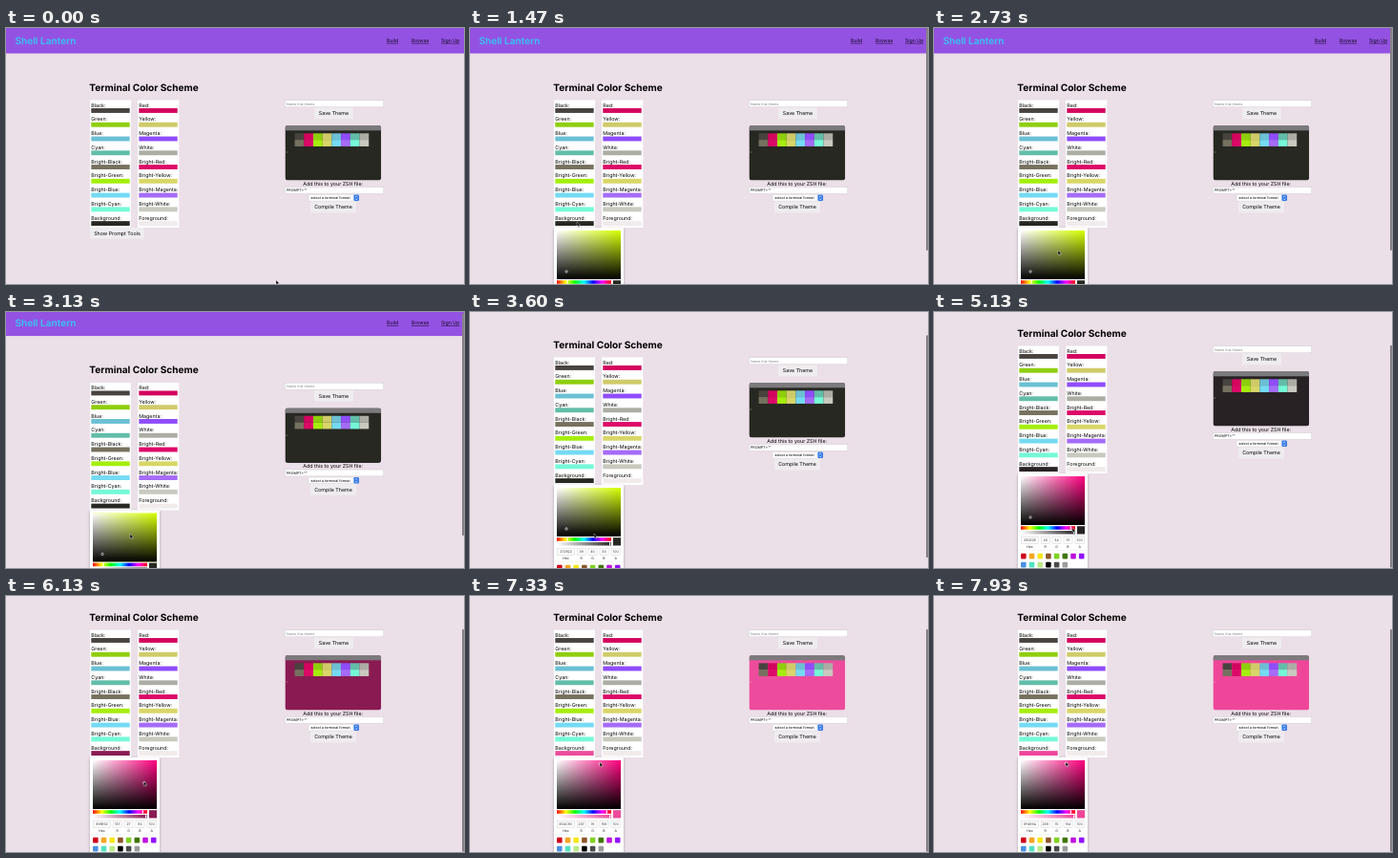
An HTML page that plays this animation: 480x268 px, repeating every 8000 ms.

```html
<!DOCTYPE html>
<html lang="en">
<head>
<meta charset="utf-8">
<title>Terminal Color Scheme</title>
<style>
  html, body { margin: 0; width: 100%; height: 100%; overflow: hidden; background: #ebdfe8; }
  svg { display: block; width: 480px; height: 268px; }
  text { font-family: Inter, Roboto, sans-serif; text-rendering: geometricPrecision; white-space: pre; }
</style>
</head>
<body>
<svg id="stage" viewBox="0 0 480 268"></svg>
<script>
const LOOP = 8000, OPEN = 1470, HUE_PRESS = 4200, SAT_PRESS = 5450;
const $ = id => document.getElementById(id);

// Markup helpers; text is placed by its vertical centre.
const rect = (x, y, w, h, fill, more = '') =>
  `<rect x="${x}" y="${y}" width="${w}" height="${h}" fill="${fill}" ${more}/>`;
const text = (x, y, str, size = 5.33, more = '') =>
  `<text x="${x}" y="${y + size * 0.36}" font-size="${size}" ${more}>${str}</text>`;
const mid = (x, y, str, size, more = '') => text(x, y, str, size, `text-anchor="middle" ${more}`);
const button = (x, y, w, label) =>
  rect(x, y, w, 11.8, '#efecef', 'rx=".6"') + mid(x + w / 2, y + 5.9, label);
const field = (x, y, w, h) =>
  rect(x, y, w, h, '#fff', 'stroke="#c9c4c9" stroke-width=".4"');
const gradient = (id, attrs, stops) => `<linearGradient id="${id}" ${attrs}>` +
  stops.map(([at, color, alpha = 1]) =>
    `<stop offset="${at}" stop-color="${color}" stop-opacity="${alpha}"/>`).join('') +
  '</linearGradient>';

const names = ['Black', 'Red', 'Green', 'Yellow', 'Blue', 'Magenta', 'Cyan', 'White'];
const labels = [...names, ...names.map(n => 'Bright-' + n), 'Background', 'Foreground'];
const colors = ['#48433f', '#d3055f', '#8fce0c', '#d0cb69', '#6bc0d3', '#8f4dfa', '#63bda8', '#adada5',
  '#76715e', '#dd0968', '#a5ee0e', '#d9d669', '#75daf3', '#a56cf8', '#74f9d6', '#c9c9bf',
  '#272822', '#f1ebeb'];
const presets = ['#d0021b', '#f5a623', '#f8e71c', '#8b572a', '#7ed321', '#417505', '#bd10e0', '#9013fe',
  '#4a90e2', '#50e3c2', '#b8e986', '#000', '#4a4a4a', '#9b9b9b', '#fff'];

const header = rect(0, 0, 480, 26.6, '#9452e2') +
  text(9.5, 13.2, 'Shell Lantern', 10.1, 'font-weight="600" fill="#35c5f2"') +
  [[399, 'Build'], [425, 'Browse'], [456, 'Sign Up']].map(([x, s]) =>
    text(x, 13, s, 5.2, 'fill="#10081c" text-decoration="underline"')).join('');

const swatches = rect(88, 75.5, 43, 133.5, '#fff') + rect(138, 75.5, 43.3, 133.5, '#fff') +
  labels.map((label, i) => {
    const x = i % 2 ? 139.3 : 89.3, y = 80.6 + (i >> 1) * 14.77;
    return text(x, y, label + ':') +
      rect(x, y + 3.4, 40.4, 4.9, colors[i], i === 16 ? 'class="chosen"' : '');
  }).join('');

const terminal = `<g clip-path="url(#window)">` +
  rect(292.5, 102, 100.7, 57.5, '#272822', 'class="chosen"') +
  rect(292.5, 102, 100.7, 5.3, '#7c7a7c') + '</g>' +
  colors.slice(0, 16).map((c, i) =>
    rect(302.6 + i % 8 * 9.7, 110.3 + (i >> 3) * 6.8, 9.75, 6.85, c)).join('') +
  text(293, 130, '~', 3.5, 'fill="#fff"');

const side = field(292.3, 75.8, 103.5, 7) +
  text(294, 79.4, 'Name this theme', 3.7, 'fill="#888"') +
  button(323, 83.5, 41, 'Save Theme') + terminal +
  mid(342.7, 162.9, 'Add this to your ZSH file:') +
  field(292.3, 166.6, 103.5, 6.8) + text(294, 170.1, 'PROMPT=""', 3.7) +
  rect(317, 174.6, 53, 6.4, '#fff', 'rx="1.2" stroke="#c4c0c4" stroke-width=".3"') +
  text(319.5, 177.8, 'select a terminal format', 3.7) +
  rect(364.4, 174.6, 5.6, 6.4, '#3478e5', 'rx="1.2"') +
  '<path d="M366 177.2l1.2-1.5 1.2 1.5M366 178.4l1.2 1.5 1.2-1.5" fill="none" stroke="#fff" stroke-width=".6"/>' +
  button(319, 181.6, 48, 'Compile Theme');

const values = [['Hex', 91.5, 18], ['R', 112.2, 9], ['G', 124, 9], ['B', 136, 9], ['A', 148, 9.5]];
const picker = `<g id="picker">` +
  rect(88, 209, 73, 104, '#fff', 'rx="1" filter="url(#shadow)"') +
  rect(91, 212, 67, 51, '#cf0', 'id="pure"') +
  rect(91, 212, 67, 51, 'url(#toWhite)') + rect(91, 212, 67, 51, 'url(#toBlack)') +
  '<circle id="handle" r="1.2" fill="none" stroke="#fff" stroke-width=".6"/>' +
  rect(91, 264.2, 57, 3.6, 'url(#rainbow)') +
  rect(0, 264.5, 1.3, 3, '#fff', 'id="hueMark"') +
  rect(91, 269, 57, 3.5, 'url(#alpha)') + rect(146, 269.3, 1.3, 2.9, '#fff') +
  rect(150, 264.2, 8, 8.3, '#272822', 'class="chosen"') +
  values.map(([label, x, w], i) => field(x, 275.6, w, 6.6) +
    mid(x + w / 2, 279, '', 3.5, `id="value${i}" fill="#333"`) +
    mid(x + w / 2, 285.8, label, 3.5, 'fill="#222"')).join('') +
  rect(88, 289.6, 73, .4, '#e6e6e6') +
  presets.map((c, i) => rect(91 + i % 8 * 8.7, 292.8 + (i >> 3) * 9, 5.6, 5.6, c, 'rx="1"')).join('') +
  '</g>';

const black = '#000', white = '#fff';
$('stage').innerHTML = '<defs>' +
  gradient('toWhite', '', [[0, white], [1, white, 0]]) +
  gradient('toBlack', 'x2="0" y2="1"', [[0, black, 0], [1, black]]) +
  gradient('rainbow', '', [0, 1, 2, 3, 4, 5, 6].map(i => [i / 6, `hsl(${i * 60},100%,50%)`])) +
  gradient('alpha', '', [[0, white], [1, '#272822']]) +
  '<clipPath id="window"><rect x="292.5" y="102" width="100.7" height="57.5" rx="3"/></clipPath>' +
  '<filter id="shadow"><feDropShadow dx="0" dy="1" stdDeviation="1.4" flood-opacity=".3"/></filter></defs>' +
  rect(0, 0, 480, 268, '#ebdfe8') +
  '<g id="page">' + header +
  text(87.3, 62, 'Terminal Color Scheme', 10.1, 'font-weight="700"') +
  swatches + side + button(88, 209, 57, 'Show Prompt Tools') + picker + '</g>' +
  rect(478, 0, 2, 233, '#858088', 'id="bar" rx="1"') +
  '<path id="cursor" d="M0 0v4.6l1.1-1 .8 1.8 .9-.4-.8-1.7h1.5z" fill="#000" stroke="#fff" stroke-width=".35"/>';

// Keyframes: [time, ...values], eased between neighbours.
const pointer = [[0, 283, 264], [70, 283, 264], [130, 262, 239], [400, 262, 239], [1200, 112, 203],
  [1500, 112, 203], [2270, 118, 222], [2470, 118, 222], [2700, 130, 233], [3600, 130, 232],
  [4200, 131, 226], [4650, 145, 226], [5130, 145, 226], [SAT_PRESS, 144, 214],
  [6130, 144.296, 194.1], [7330, 136.015, 174.1], [7930, 137.877, 173.7]];
const scrolling = [[0, 0], [3070, 0], [3500, 28], [4130, 28], [4300, 40]];

function at(keys, t) {
  const i = keys.findIndex(k => k[0] > t);
  if (i < 0) return keys[keys.length - 1].slice(1);
  const a = keys[i - 1], b = keys[i], u = (t - a[0]) / (b[0] - a[0]), e = u * u * (3 - 2 * u);
  return a.slice(1).map((v, n) => v + (b[n + 1] - v) * e);
}

function hsv(h, s, v) {
  const channel = n => {
    const k = (n + h / 60) % 6;
    return Math.round(255 * v * (1 - s * Math.max(0, Math.min(k, 4 - k, 1))));
  };
  return [channel(5), channel(3), channel(1)];
}

const set = (id, attrs) => {
  for (const name in attrs) $(id).setAttribute(name, attrs[name]);
};

function draw(t) {
  const [x, y] = at(pointer, t), [scroll] = at(scrolling, t);
  const hue = t < HUE_PRESS ? 70 : (at(pointer, Math.min(t, 5130))[0] - 92.73) * 6.316;
  const dragging = t >= SAT_PRESS;
  const sat = dragging ? (x - 90.5) / 67 : 0.15;
  const val = dragging ? 1 - (y - 170.5) / 51 : 0.157;
  const rgb = hsv(hue, sat, val);
  const hex = rgb.map(c => c.toString(16).padStart(2, '0')).join('').toUpperCase();
  const color = '#' + hex, shown = t >= OPEN ? 'visible' : 'hidden';

  set('page', { transform: `translate(0 ${-scroll})` });
  set('picker', { visibility: shown });
  set('bar', { visibility: shown, y: scroll * 268 / 308 });
  set('cursor', { transform: `translate(${x} ${y})` });
  set('pure', { fill: `hsl(${hue},100%,50%)` });
  set('handle', { cx: 91 + sat * 67, cy: 212 + (1 - val) * 51 });
  set('hueMark', { x: 90.4 + hue / 360 * 57 });
  document.querySelectorAll('.chosen').forEach(el => el.setAttribute('fill', color));
  $('alpha').lastChild.setAttribute('stop-color', color);
  [hex, ...rgb, 100].forEach((v, i) => $('value' + i).textContent = v);
}

function tick() {
  draw(performance.now() % LOOP);
  requestAnimationFrame(tick);
}
tick();
</script>
</body>
</html>
```
